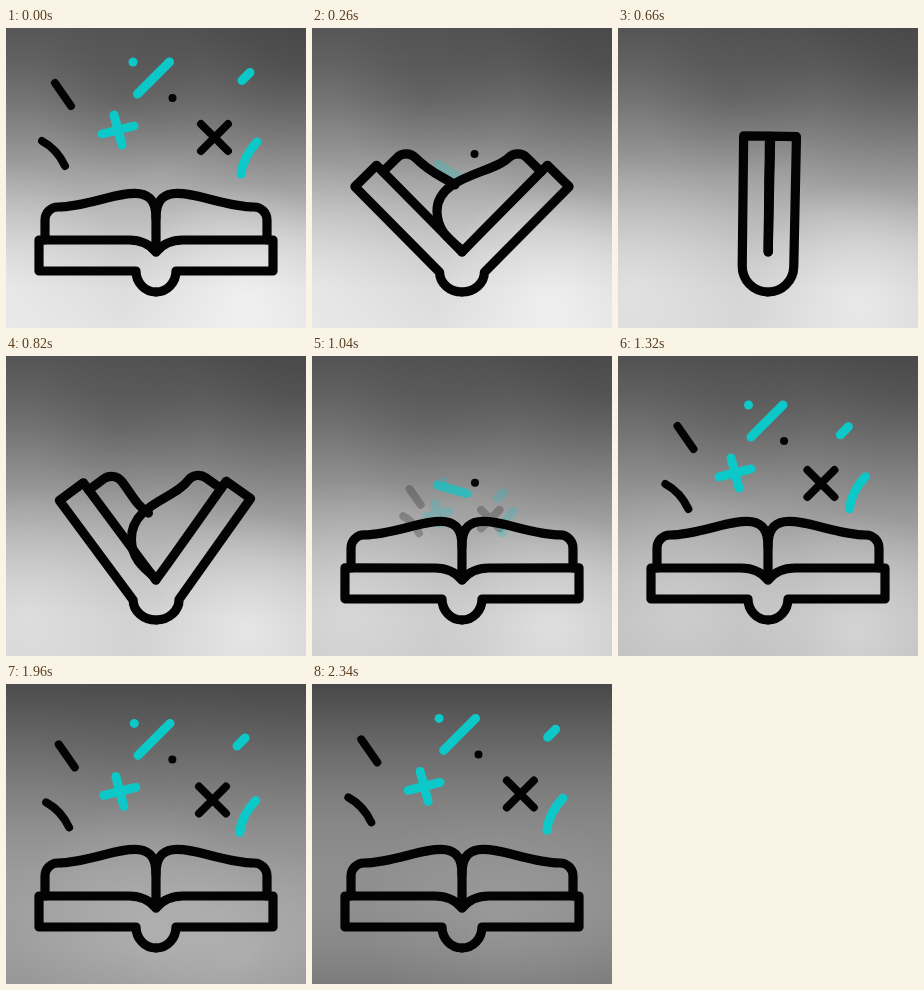
An HTML page with a canvas for the animation above (2.38 s loop, 300 by 300 pixels).

```html
<!DOCTYPE html>
<html lang="en">
<head>
<meta charset="utf-8">
<title>Magic book</title>
<style>
html, body { margin: 0; width: 100%; height: 100%; overflow: hidden; }
canvas { display: block; width: 300px; height: 300px; }
</style>
</head>
<body>
<canvas id="stage" width="300" height="300"></canvas>
<script>
const ctx = document.getElementById('stage').getContext('2d');
const LOOP = 2380, INK = '#030303', CYAN = '#0cc8c9';
const clamp = v => Math.max(0, Math.min(1, v));
const mix = (a, b, k) => a + (b - a) * k;
const smooth = v => { v = clamp(v); return v * v * (3 - 2 * v); };
const rad = deg => deg * Math.PI / 180;

// Each spark rests at x, y; speed scales its slow drift, life and pull its way into the book.
const spark = (x, y, color, path, options) =>
  ({ x, y, color, path: new Path2D(path), speed: 1, life: 0.6, spin: 0, pull: 1, ...options });
const SPARKS = [
  spark(57, 67, INK, 'M-8-12L8 11'),
  spark(48, 126, INK, 'M-12-13Q3-5 11 12'),
  spark(127, 34, CYAN, 'M0 0h.01'),
  spark(147.5, 50, CYAN, 'M-16 16L16-16', { life: 0.74, spin: 115 }),
  spark(166.5, 70, INK, 'M0 0h.01', { life: 1, pull: 0.7 }),
  spark(240, 48.5, CYAN, 'M-4 4L4-4', { speed: 1.75 }),
  spark(112, 102, CYAN, 'M-4-15L4 15M-16 4L16-4'),
  spark(208.5, 109.5, INK, 'M-13.5-13.5l27 27m0-27l-27 27', { speed: 1.2 }),
  spark(243, 130, CYAN, 'M8-16Q-6-1-8 16', { speed: 0.45 })
];

function haze(x, y, r, rgb, alpha) {
  const glow = ctx.createRadialGradient(x, y, 0, x, y, r);
  glow.addColorStop(0, `rgba(${rgb},${alpha})`);
  glow.addColorStop(1, `rgba(${rgb},0)`);
  ctx.fillStyle = glow;
  ctx.fillRect(0, 0, 300, 300);
}

function drawBackground(t) {
  const k = Math.pow(t / LOOP, 1.7);
  const sky = ctx.createLinearGradient(0, 0, 0, 300);
  for (let y = 0; y <= 1; y += 0.125) {
    const bright = 82 + 144 * smooth(0.1 + 0.9 * y);
    const dim = 72 + 70 * Math.sin(Math.PI * 0.75 * y);
    const v = Math.round(mix(bright, dim, k));
    sky.addColorStop(y, `rgb(${v},${v},${v})`);
  }
  ctx.fillStyle = sky;
  ctx.fillRect(0, 0, 300, 300);
  haze(290, 40, 170, '0,0,0', 0.2 * (1 - k));
  haze(115, 65, 90, '0,0,0', 0.14 * (1 - k));
  haze(240, 275, 120, '255,255,255', 0.55 * (1 - k));
  haze(mix(-10, 190, k), mix(260, 235, k), 130, '255,255,255', mix(0.35, 0.08, k));
}

// Geometry of the left half, with the spine at x = 0; (c, s) points along the cover to the spine.
function foldBook(angle) {
  const c = Math.cos(rad(angle)), s = Math.sin(rad(angle)), shut = angle / 90;
  const r = 20 + 5.8 * shut ** 1.3;
  const thick = 31 - 5.2 * shut ** 3;
  const spineY = 264 - r - (1 - s) + 3 * Math.sin(rad(2 * angle));
  const length = 97 + 33 * s;
  const bottom = [-r - length * c, spineY - length * s];
  const top = [bottom[0] + thick * s, bottom[1] - thick * c];
  const bend = Math.min(1, angle / 45);
  const slim = 1 - clamp(angle / 45 - 1) ** 2;
  const along = ([x, y], d) => [x + d * c, y + d * s];
  return { c, s, r, spineY, bottom, top, bend, slim, along };
}

function drawCover({ r, spineY, bottom, top, along }) {
  ctx.beginPath();
  ctx.moveTo(0, 224);
  ctx.quadraticCurveTo(...along(top, 107), ...along(top, 90));
  ctx.lineTo(...top);
  ctx.lineTo(...bottom);
  ctx.lineTo(-r, spineY);
  ctx.ellipse(0, spineY, r, 264 - spineY, 0, Math.PI, Math.PI / 2, true);
  ctx.stroke();
}

// The front page also draws the spine, which bulges over the back page as the book folds.
function drawPage({ c, s, top, bend, slim, along }, front) {
  const rise = 33 * slim, round = Math.min(13, rise * 0.45), swell = bend * slim;
  const edge = along(top, 6 + 3 * bend);
  const corner = [edge[0] + rise * s, edge[1] - rise * c];
  const x = (front ? 25 : -7) * swell;
  const y = mix(190, front ? 183 : 157, bend);
  const lift = mix(48, front ? 35 : 9, bend);
  ctx.beginPath();
  if (front) {
    ctx.moveTo(0, 222);
    ctx.bezierCurveTo(12 * swell, 212, x, y + 20, x, y);
  } else {
    ctx.moveTo(x, y);
  }
  ctx.bezierCurveTo(front ? x : x - 13 * swell, y - lift,
    ...along(corner, mix(56, 35, bend)), ...along(corner, round));
  ctx.arcTo(...corner, ...edge, round);
  ctx.lineTo(...edge);
  ctx.stroke();
}

function drawBook(t) {
  const book = foldBook(90 * (smooth((t - 60) / 400) - smooth((t - 648) / 400)));
  const u = clamp((t - 400) / 600);
  const tilt = 7.2 * Math.sin(2 * Math.PI * u) * (1 - u) ** 2;
  ctx.save();
  ctx.translate(150, 238);
  ctx.rotate(rad(tilt));
  ctx.translate(0, -238);
  ctx.strokeStyle = INK;
  ctx.lineWidth = 9.2;
  for (const front of [false, true]) {
    drawCover(book);
    drawPage(book, front);
    ctx.scale(-1, 1);
  }
  ctx.restore();
}

function drawSparks(t) {
  const inside = t < 320 ? (t / 320) ** 2 : (1 - clamp((t - 980) / 320)) ** 3;
  const drift = t < 980 ? 0 : ((LOOP - t) / 1060) ** 1.1;
  for (const { x, y, color, path, speed, life, spin, pull } of SPARKS) {
    const k = inside * pull, scale = 1 - 0.6 * inside;
    const restX = x + (162 - x) * 0.1 * speed * drift;
    const restY = y + 15 * speed * drift;
    ctx.save();
    ctx.globalAlpha = clamp((life - inside) / 0.3);
    ctx.translate(mix(restX, x < 150 ? 132 : 158, k), mix(restY, 190, k));
    ctx.rotate(rad(spin * inside));
    ctx.scale(scale, scale);
    ctx.strokeStyle = color;
    ctx.lineWidth = (color === INK ? 8 : 9) / scale;
    ctx.stroke(path);
    ctx.restore();
  }
}

function render() {
  const t = (performance.now() - start) % LOOP;
  ctx.lineCap = ctx.lineJoin = 'round';
  drawBackground(t);
  drawSparks(t);
  drawBook(t);
  requestAnimationFrame(render);
}
const start = performance.now();
render();
</script>
</body>
</html>
```
